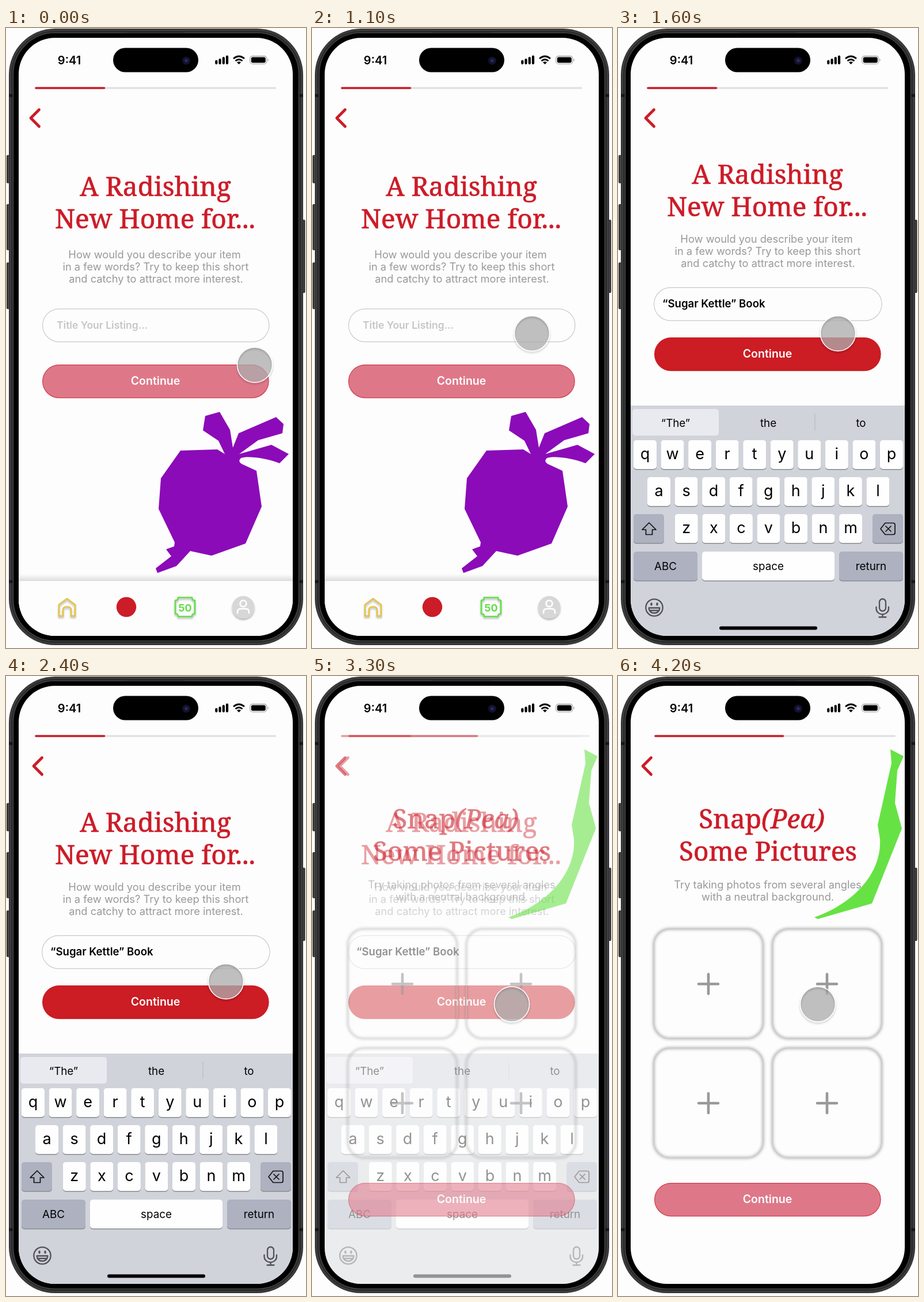
An HTML page that plays this animation: 521 by 1074 pixels, repeating every 4300 ms.

```html
<!DOCTYPE html>
<html lang="en">
<head>
<meta charset="utf-8">
<title>Listing flow</title>
<style>
html, body { margin: 0; width: 100%; height: 100%; overflow: hidden; background: #fdfdfd; }
svg { display: block; width: 521px; height: 1074px; font-family: Inter, Roboto, sans-serif; }
.mid { text-anchor: middle; }
.title { font: 400 46px "Noto Serif", serif; fill: #cc1c28; stroke: #cc1c28; stroke-width: .7; text-anchor: middle; }
.sub { font-size: 18.3px; fill: #999; text-anchor: middle; }
.label { font-size: 19.5px; font-weight: 600; fill: #fff; text-anchor: middle; }
.letter { font-size: 27px; text-anchor: middle; }
.word { font-size: 18.8px; text-anchor: middle; }
.bar { stroke-width: 3.6; stroke-linecap: round; }
.line { fill: none; stroke-linecap: round; stroke-linejoin: round; }
</style>
</head>
<body>
<svg viewBox="0 0 521 1074">
  <defs>
    <clipPath id="screen"><rect x="22" y="17" width="476" height="1036" rx="63"/></clipPath>
    <filter id="soft" x="-20%" y="-20%" width="140%" height="140%"><feGaussianBlur stdDeviation="2.2"/></filter>
    <filter id="drop" x="-30%" y="-30%" width="160%" height="170%"><feDropShadow dx="0" dy="2.5" stdDeviation="1.6" flood-opacity=".3"/></filter>
    <linearGradient id="navShade" x1="0" y1="0" x2="0" y2="1">
      <stop offset="0" stop-color="#000" stop-opacity="0"/><stop offset="1" stop-color="#000" stop-opacity=".13"/>
    </linearGradient>
    <linearGradient id="side" x1="0" x2="1"><stop offset="0" stop-color="#222"/><stop offset=".5" stop-color="#555"/><stop offset="1" stop-color="#1a1a1a"/></linearGradient>
  </defs>

  <!-- phone body -->
  <g fill="url(#side)">
    <rect x="1" y="220" width="8" height="49" rx="2"/>
    <rect x="1" y="305" width="8" height="80" rx="2"/>
    <rect x="1" y="406" width="8" height="81" rx="2"/>
    <rect x="512" y="332" width="7.5" height="127" rx="2"/>
  </g>
  <rect x="5" y="1" width="511" height="1068" rx="80" fill="#2a2a2b"/>
  <rect x="7.5" y="3.5" width="506" height="1063" rx="77.5" fill="none" stroke="#3d3d3e" stroke-width="3"/>
  <path d="M5 117h8M508 117h8M5 959h8M508 959h8" stroke="#161616" stroke-width="5"/>
  <path d="M210 9h100" stroke="#1b1b1b" stroke-width="4"/>
  <rect x="12.5" y="8.5" width="496" height="1053" rx="72" fill="#000" stroke="#4d4d4f" stroke-width="1.2"/>
  <rect x="22" y="17" width="476" height="1036" rx="63" fill="#fdfdfd"/>

  <g clip-path="url(#screen)">
    <g id="form">
      <g id="keyboard">
        <rect x="22" y="654" width="476" height="400" fill="#d0d3da"/>
        <rect x="25" y="660" width="150" height="46" rx="5" fill="#e9eaf0"/>
        <path d="M342 668v30" stroke="#b4b7bf"/>
        <text class="word" x="100" y="691">“The”</text>
        <text class="word" x="261" y="691">the</text>
        <text class="word" x="422" y="691">to</text>
        <g id="keys"></g>
        <path class="line" d="M54 857l-12 12h6.500v8.500h11V869H66z" stroke="#111" stroke-width="1.7"/>
        <path class="line" d="M464 857.500h14q3 0 3 3v14q0 3-3 3H464l-8-10zM465 863l9 9m0-9l-9 9" stroke="#111" stroke-width="1.7"/>
        <g class="line" stroke="#515256" stroke-width="2.3">
          <circle cx="63" cy="1004" r="14.700"/>
          <path d="M53.500 1004.500h19q-1 9-9.500 9t-9.500-9zM54.500 1009h17"/>
          <path d="M58 997v2M68 997v2" stroke-width="3.400"/>
          <rect x="454" y="989" width="11" height="21" rx="5.500"/>
          <path d="M448.500 1003v3a10.700 9.500 0 0 0 21.500 0v-3M459.500 1016v4.500M453.500 1020.500h12"/>
        </g>
        <rect x="176" y="1036.500" width="170" height="6" rx="3" fill="#000"/>
      </g>

      <path class="bar" d="M52 104H467.500" stroke="#e2e2e2"/>
      <path class="bar" d="M52 104H170.500" stroke="#cc1c28"/>
      <path id="back" class="line" d="M57.500 141.500L43 156l14.500 14.500" stroke="#cc1c28" stroke-width="4.800"/>
      <g id="heading">
        <text class="title" x="259.500" y="291">A Radishing</text>
        <text class="title" x="259" y="347">New Home for...</text>
      </g>
      <g id="hint">
        <text class="sub" x="258" y="398.500">How would you describe your item</text>
        <text class="sub" x="260" y="419.800">in a few words? Try to keep this short</text>
        <text class="sub" x="260.500" y="441">and catchy to attract more interest.</text>
      </g>
      <g id="empty">
        <rect x="63.600" y="486.600" width="393.300" height="57" rx="28.500" fill="none" stroke="#c9c9c9" stroke-width="1.200"/>
        <text x="88" y="520.500" font-size="17.500" font-weight="600" fill="#c6c6c6">Title Your Listing...</text>
      </g>
      <g id="filled">
        <rect x="62.600" y="449.600" width="395.500" height="57.300" rx="28.600" fill="none" stroke="#c9c9c9" stroke-width="1.200"/>
        <text x="77" y="484" font-size="18.600" font-weight="600">“Sugar Kettle” Book</text>
      </g>
      <g id="button">
        <rect id="buttonFace" x="63.600" y="583.600" width="392.500" height="57" rx="28.500" stroke-width="1.200"/>
        <text class="label" x="259.500" y="617.500">Continue</text>
      </g>

      <g id="home">
        <path fill="#8b0bb8" d="M303 732L367 730 380 738 369 715 342 697 346 672 371 665 389 696 394 727 404 702 469 674 482 686 480 702 438 714 405 738 461 722 491 738 475 754C450 744 418 741 408 745Q402 750 409 755L435 767 444 829 416 893 357 914 320 906 296 932 263 944 260 936 287 915 278 903 292 898 293 891 265 833 269 780Z"/>
        <rect x="22" y="946" width="476" height="12" fill="url(#navShade)"/>
        <rect x="22" y="958" width="476" height="96" fill="#fdfdfd"/>
        <g filter="url(#drop)">
          <path class="line" d="M92 1018.500V999l14-10.500L120 999v19.500h-7V1008q0-5.500-7-5.500t-7 5.500v10.500z" stroke="#e2c243" stroke-width="2.600"/>
          <path class="line" d="M299 986.500h24q0 5 5 5v23q-5 0-5 5h-24q0-5-5-5v-23q5 0 5-5z" stroke="#63dd48" stroke-width="2.600"/>
          <circle cx="412" cy="1003.500" r="19.500" fill="#d7d7d7"/>
        </g>
        <circle cx="209" cy="1003" r="17.200" fill="#cc1c28"/>
        <text class="mid" x="311" y="1010.500" font-size="18" font-weight="700" fill="#63dd48">50</text>
        <g class="line" stroke="#fff" stroke-width="2.600">
          <circle cx="412" cy="997" r="5.500"/>
          <path d="M402 1013.500v-1.500q0-6 6-6h8q6 0 6 6v1.500"/>
        </g>
      </g>
    </g>

    <g id="photos">
      <path class="bar" d="M65 104H480.500" stroke="#e2e2e2"/>
      <path class="bar" d="M65 104H286.500" stroke="#cc1c28"/>
      <path class="line" d="M57.500 141.500L43 156l14.500 14.500" stroke="#cc1c28" stroke-width="4.800"/>
      <path fill="#67e244" d="M473 127L496 139 485 164 481 220 493 264 441 394 347 421 341 418C405 396 458 345 455 283L451 258 475 151Z"/>
      <text class="title" x="249.500" y="264">Snap<tspan font-style="italic">(Pea)</tspan></text>
      <text class="title" x="260.500" y="320">Some Pictures</text>
      <text class="sub" x="260" y="367.800">Try taking photos from several angles</text>
      <text class="sub" x="260" y="389">with a neutral background.</text>
      <g id="cards"></g>
      <rect x="63.600" y="878.600" width="392.500" height="57" rx="28.500" fill="#de7889" stroke="#cf3a49" stroke-width="1.200"/>
      <text class="label" x="259.500" y="912.500">Continue</text>
    </g>
  </g>

  <!-- status bar -->
  <text class="mid" x="110" y="62.500" font-size="20" font-weight="600">9:41</text>
  <rect x="186" y="34.500" width="148" height="42" rx="21"/>
  <circle cx="313" cy="56.500" r="7" fill="#12122a"/>
  <circle cx="313" cy="56.500" r="3" fill="#292760"/>
  <path d="M365.300 61v-3.500M371.500 61v-6M377.800 61v-9M384 61V49.500" stroke="#000" stroke-width="4.200" stroke-linecap="round"/>
  <path d="M395 53q9.500-8 19 0M398.500 57q6-5 12 0" fill="none" stroke="#000" stroke-width="2.900"/>
  <path d="M401 59.500q3.500-2.500 7 0l-3.500 3.500z"/>
  <rect x="423.800" y="48.600" width="29" height="13.600" rx="4.300" fill="none" stroke="#999" stroke-width="1.100"/>
  <rect x="425.800" y="50.600" width="25" height="9.600" rx="2.600"/>
  <path d="M454.500 53q2.500 2.400 0 4.800z" fill="#999"/>

  <g id="cursor">
    <circle r="30.500" fill="#acacac" fill-opacity=".76"/>
    <circle r="30.500" fill="none" stroke="#fff" stroke-width="1.500" filter="url(#drop)"/>
  </g>
</svg>
<script>
const $ = id => document.getElementById(id);
const LOOP = 4300;

function key(x, y, w, label, dark) {
  const cls = label.length > 1 ? 'word' : 'letter';
  const base = y + (cls === 'word' ? 31.5 : 33);
  return `<rect x="${x}" y="${y + 1.4}" width="${w}" height="50" rx="5" fill="#898b90"/>` +
    `<rect x="${x}" y="${y}" width="${w}" height="50" rx="5" fill="${dark ? '#adb1c0' : '#fefefe'}"/>` +
    `<text class="${cls}" x="${x + w / 2}" y="${base}">${label}</text>`;
}
const row = (letters, x, y) =>
  [...letters].map((c, i) => key(x + i * 47.55, y, 40, c)).join('');

$('keys').innerHTML = row('qwertyuiop', 27, 714) + row('asdfghjkl', 51, 778) + row('zxcvbnm', 98.8, 842) +
  key(27, 842, 53, '', true) + key(442, 842, 53, '', true) +
  key(27, 907, 111, 'ABC', true) + key(146, 907, 230, 'space') + key(384, 907, 111, 'return', true);

function card(x, y) {
  const box = `x="${x}" y="${y}" width="190" height="190" rx="28" fill="none"`;
  return `<rect ${box} stroke="#000" stroke-opacity=".25" stroke-width="4" filter="url(#soft)"/>` +
    `<rect ${box} stroke="#c9c9c9" stroke-width="1.300"/>` +
    `<path class="line" d="M${x + 78} ${y + 95.5}h34m-17-17v34" stroke="#999" stroke-width="4.600"/>`;
}
$('cards').innerHTML = card(62, 438) + card(268, 438) + card(62, 644.5) + card(268, 644.5);

const clamp = v => Math.min(1, Math.max(0, v));
const mix = (a, b, p) => a + (b - a) * p;
const blend = (a, b, p) => `rgb(${a.map((v, i) => Math.round(mix(v, b[i], p)))})`;
const inOut = v => v * v * (3 - 2 * v);
const span = (t, from, length) => clamp((t - from) / length);

// cubic-bezier(0, 0, .58, 1)
function easeOut(x) {
  let lo = 0, hi = 1;
  for (let i = 0; i < 20; i++) {
    const s = (lo + hi) / 2;
    if (1.74 * s * s * (1 - s) + s ** 3 < x) lo = s; else hi = s;
  }
  return lo * lo * (3 - 2 * lo);
}

const move = (id, x, y) => $(id).setAttribute('transform', `translate(${x.toFixed(2)} ${y.toFixed(2)})`);
const fade = (id, a) => {
  $(id).setAttribute('opacity', a.toFixed(3));
  $(id).style.display = a > 0.002 ? '' : 'none';
};

function draw(t) {
  const typed = t < 1165 ? 0 : t > 1425 ? 1 : easeOut(span(t, 1165, 260));
  const next = t < 3195 ? 0 : t > 3455 ? 1 : easeOut(span(t, 3195, 260));

  move('back', 5 * typed, 0);
  move('heading', 0, -21 * typed);
  move('hint', 0, -27 * typed);
  move('button', 0, -47 * typed);
  $('buttonFace').setAttribute('fill', blend([222, 120, 137], [204, 28, 36], typed));
  $('buttonFace').setAttribute('stroke', blend([207, 58, 73], [204, 28, 36], typed));
  move('empty', -8 * typed, -53 * typed);
  move('filled', 10 * (1 - typed), 47 * (1 - typed));
  fade('empty', (1 - typed) ** 2);
  fade('filled', typed);
  fade('keyboard', typed);
  fade('home', 1 - typed);
  fade('form', 1 - next);
  fade('photos', next);

  const a = inOut(span(t, 100, 900)), b = inOut(span(t, 2420, 700));
  move('cursor', 432 - 50 * a - 35 * b, 583.5 - 54.5 * a + 39.5 * b);
}

const start = performance.now();
function tick() {
  draw((performance.now() - start) % LOOP);
  requestAnimationFrame(tick);
}
tick();
</script>
</body>
</html>
```
